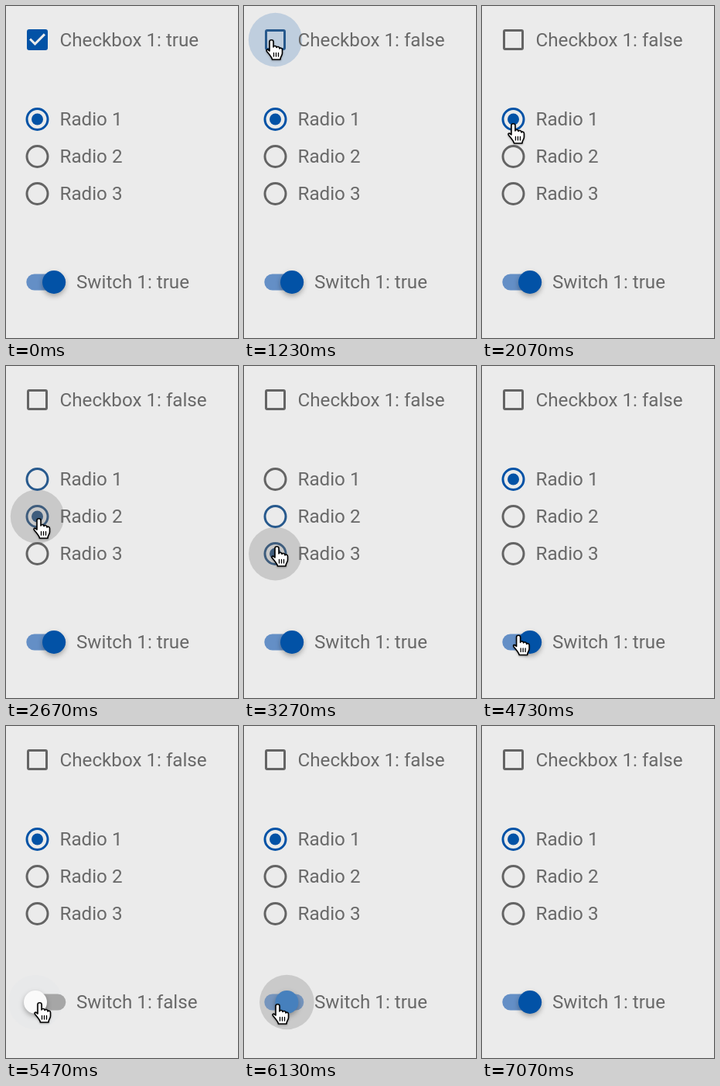
An HTML page for the animation above (7470 ms loop, 300 px wide and 428 px high).

```html
<!DOCTYPE html>
<html lang="en">
<head>
<meta charset="utf-8">
<style>
  html, body { margin: 0; width: 100%; height: 100%; overflow: hidden; background: #ebebeb; }
  svg { display: block; width: 300px; height: 428px; }
  text { font: 24.2px Roboto, sans-serif; fill: #696969; }
  #thumb { filter: drop-shadow(0 3px 3px rgba(0, 0, 0, .3)); }
  #hand { filter: drop-shadow(0 1px 1px rgba(0, 0, 0, .3)); }
</style>
</head>
<body>
<svg viewBox="0 0 300 428">
  <circle id="ripple"/>

  <g id="checkbox" transform="translate(22.5 25.5) scale(1.5)">
    <rect id="box" x="4" y="4" width="16" height="16" rx="1" stroke="currentColor" stroke-width="2"/>
    <path id="tick" fill="#ebebeb" d="M10 17l-5-5 1.41-1.41L10 14.17l7.59-7.59L19 8z"/>
  </g>
  <text id="checkLabel" x="69.5" y="52"></text>

  <g id="radios"></g>

  <rect id="track" x="26.3" y="345.5" width="51" height="21" rx="10.5"/>
  <circle id="thumb" cy="356" r="15"/>
  <text id="switchLabel" x="91" y="364"></text>

  <g id="hand" stroke="#000" stroke-width="1.6" stroke-linejoin="round" stroke-linecap="round">
    <path fill="#fff" d="M-2 15V3C-2 0 3 0 3 3V10C3 8 7 8 7 10.5C7.5 9 11 9 11 12C11.5 10.5 14.5 11 14.5 13.5V18C14.5 21 12 22 12 26H1.5C1 23-2 20-5.5 15.5C-7 13-4.5 12-2 15Z"/>
    <path d="M3.5 17.5v4.5M6.5 17.5v4.5M9.5 17.5v4.5" stroke-width="1.3"/>
  </g>
</svg>
<script>
const LOOP = 7470;
const GREY = [100, 100, 100], BLUE = [2, 82, 166];
const $ = id => document.getElementById(id);
const set = (el, attrs) => { for (const k in attrs) el.setAttribute(k, attrs[k]); };
const clamp = v => Math.max(0, Math.min(1, v));
const lerp = (a, b, p) => a + (b - a) * p;
const smooth = p => p * p * (3 - 2 * p);
const mix = (a, b, p) => `rgb(${a.map((v, i) => Math.round(lerp(v, b[i], p)))})`;

function bezier(x1, y1, x2, y2) {
  const at = (a, b, s) => 3 * a * s * (1 - s) ** 2 + 3 * b * s * s * (1 - s) + s ** 3;
  return x => {
    let lo = 0, hi = 1;
    for (let i = 0; i < 20; i++) {
      const mid = (lo + hi) / 2;
      if (at(x1, x2, mid) < x) lo = mid; else hi = mid;
    }
    return at(y1, y2, lo);
  };
}
const swing = bezier(.25, .8, .5, 1);
const grow = bezier(.4, 0, .2, 1);

// Mouse presses: down, up, centre y, colour of the ripple
const presses = [
  [1030, 1190, 43.5, BLUE],
  [2470, 2630, 194, GREY],
  [3080, 3230, 242, GREY],
  [3830, 4040, 146, GREY],
  [4930, 5220, 356, BLUE],
  [5870, 6030, 356, GREY]
];
const [checkUp, r2Up, r3Up, r1Up, offUp, onUp] = presses.map(p => p[1]);
const SWITCH_OFF = 5070;

// Fingertip: time, x, y, eased arrival
const route = [
  [450, 84, -30], [870, 35, 43, 1], [1450, 35, 43], [2330, 42, 196], [2680, 42, 196],
  [2860, 111, 216, 1], [3060, 42, 232, 1], [3370, 42, 232],
  [3590, 131, 186, 1], [3810, 42, 136, 1], [4190, 42, 136],
  [4450, 131, 240, 1], [4770, 43, 351, 1], [4930, 43, 356], [5620, 43, 356],
  [5700, 43, 358], [6140, 43, 358], [6430, 72, 432, 1]
];

// Switches between 0 and 1 at each flip time
function toggle(t, start, ...flips) {
  const past = flips.filter(f => f <= t);
  const on = (start + past.length) % 2;
  const p = past.length ? swing(clamp((t - past.at(-1)) / 300)) : 1;
  return { on, level: lerp(1 - on, on, p) };
}

const radios = [146, 194, 242].map((cy, i) => {
  const g = document.createElementNS('http://www.w3.org/2000/svg', 'g');
  g.innerHTML = `<circle cx="40.5" cy="${cy}" r="13.5" fill="none" stroke="currentColor" stroke-width="3"/>
    <circle cx="40.5" cy="${cy}" r="7.5" fill="currentColor"/>
    <text x="69.5" y="${cy + 8}">Radio ${i + 1}</text>`;
  $('radios').append(g);
  return g;
});

function drawHand(t) {
  const i = route.findIndex(k => k[0] > t);
  $('hand').style.display = i > 0 ? '' : 'none';
  if (i < 1) return;
  const [t0, x0, y0] = route[i - 1], [t1, x1, y1, eased] = route[i];
  const linear = (t - t0) / (t1 - t0), p = eased ? smooth(linear) : linear;
  set($('hand'), { transform: `translate(${lerp(x0, x1, p)} ${lerp(y0, y1, p)})` });
}

function drawRipple(t, thumbX) {
  const press = presses.findLast(p => p[0] <= t);
  if (!press) return set($('ripple'), { opacity: 0 });
  const [down, up, cy, color] = press, age = t - down;
  const out = clamp((t - Math.max(up, down + 250)) / 300);
  const strength = color === BLUE ? .19 : .25;
  set($('ripple'), {
    cx: cy === 356 ? thumbX : 40.5, cy,
    r: 35.3 * lerp(.3, 1, grow(clamp(age / 250))),
    fill: mix(color, color, 0),
    opacity: strength * clamp(age / 100) * (1 - smooth(out))
  });
}

function draw(t) {
  const check = toggle(t, 1, checkUp);
  $('checkbox').style.color = mix(GREY, BLUE, check.level);
  set($('box'), { fill: check.on ? 'currentColor' : 'none' });
  set($('tick'), { opacity: check.on });
  $('checkLabel').textContent = `Checkbox 1: ${!!check.on}`;

  [toggle(t, 1, r2Up, r1Up), toggle(t, 0, r2Up, r3Up), toggle(t, 0, r3Up, r1Up)].forEach((s, i) => {
    radios[i].style.color = mix(GREY, BLUE, s.level);
    set(radios[i].children[1], { opacity: s.on });
  });

  const power = toggle(t, 1, SWITCH_OFF, onUp);
  const thumbX = lerp(38, 62, power.level);
  set($('track'), { fill: mix([166, 166, 166], [100, 143, 198], power.level) });
  set($('thumb'), { cx: thumbX, fill: mix([250, 250, 250], BLUE, power.level) });
  $('switchLabel').textContent = `Switch 1: ${!!power.on}`;

  drawRipple(t, thumbX);
  drawHand(t);
}

const begin = performance.now();
function tick() {
  draw((performance.now() - begin) % LOOP);
  requestAnimationFrame(tick);
}
tick();
</script>
</body>
</html>
```
